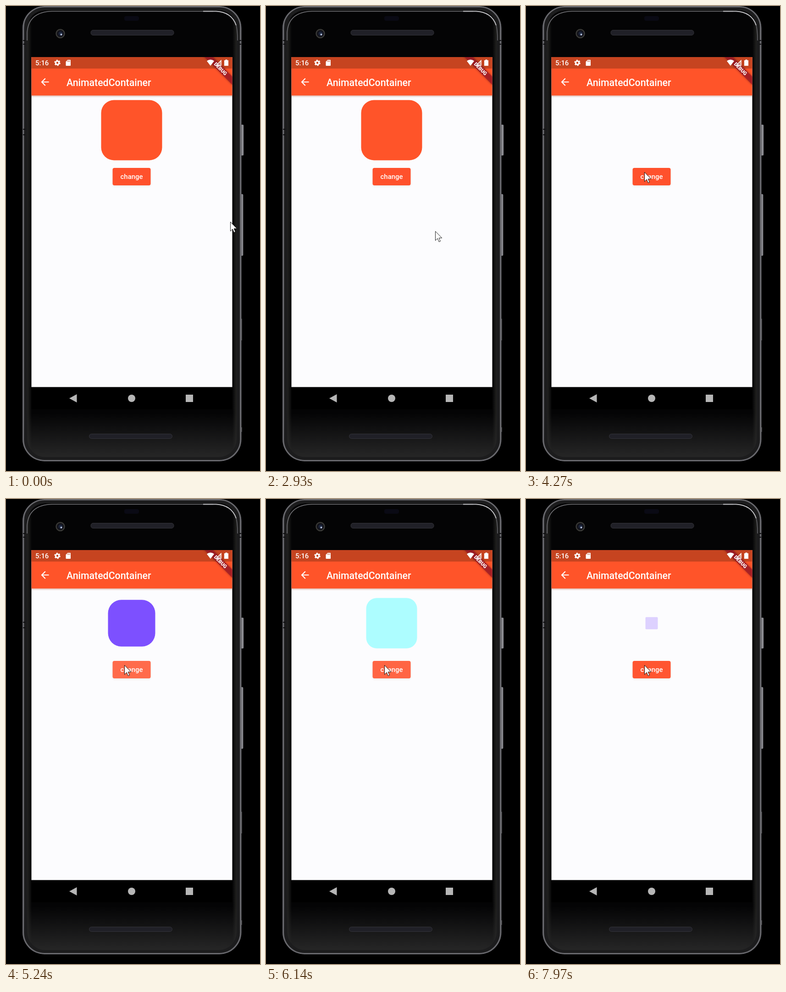
An HTML page that plays this animation: 554 by 1011 pixels, repeating every 8 s.

```html
<!DOCTYPE html>
<html lang="en">
<head>
<meta charset="utf-8">
<title>Animated container</title>
<style>
  html, body { margin: 0; width: 100%; height: 100%; overflow: hidden; background: #000; }
  svg { display: block; width: 100%; height: 100%; }
  text { font-family: Roboto, sans-serif; font-weight: 500; fill: #fff; }
</style>
</head>
<body>
<svg viewBox="0 0 554 1011">
  <defs>
    <linearGradient id="side">
      <stop offset="0" stop-color="#55555a"/>
      <stop offset=".006" stop-color="#75757a"/>
      <stop offset=".012" stop-color="#2a2a2d"/>
      <stop offset=".024" stop-color="#20201e"/>
      <stop offset=".042" stop-color="#040405"/>
      <stop offset=".958" stop-color="#040405"/>
      <stop offset=".976" stop-color="#20201e"/>
      <stop offset=".988" stop-color="#2a2a2d"/>
      <stop offset=".994" stop-color="#75757a"/>
      <stop offset="1" stop-color="#55555a"/>
    </linearGradient>
    <linearGradient id="chin" x2="0" y2="1">
      <stop offset="0" stop-color="#282828" stop-opacity="0"/>
      <stop offset="1" stop-color="#282828"/>
    </linearGradient>
    <linearGradient id="key">
      <stop offset="0" stop-color="#3c3c40"/>
      <stop offset=".6" stop-color="#9a9a9f"/>
      <stop offset="1" stop-color="#66666c"/>
    </linearGradient>
    <linearGradient id="drop" x2="0" y2="1">
      <stop offset="0" stop-color="#a04020" stop-opacity=".35"/>
      <stop offset="1" stop-color="#a04020" stop-opacity="0"/>
    </linearGradient>
    <filter id="blur" x="-20%" y="-40%" width="140%" height="180%"><feGaussianBlur stdDeviation="2"/></filter>
    <clipPath id="body"><rect x="36" y="0" width="477.500" height="990" rx="48"/></clipPath>
    <clipPath id="screen"><path d="M55.500 111H493.500V828.500H55.500Z"/></clipPath>
    <clipPath id="face"><rect x="232.500" y="352" width="83" height="38" rx="4"/></clipPath>
  </defs>

  <!-- phone -->
  <g fill="url(#key)">
    <rect x="511" y="258" width="7.500" height="67" rx="2"/>
    <rect x="511" y="409" width="6.500" height="134" rx="2"/>
    <path d="M511 680h4v47h-4zM511 916h4v10h-4z" opacity=".6"/>
  </g>
  <g clip-path="url(#body)">
    <path d="M36 0H514V990H36Z" fill="url(#side)"/>
    <path d="M36 885H514V986H36Z" fill="url(#chin)"/>
    <g fill="none">
      <rect x="43" y="6" width="463.500" height="978" rx="42" stroke="#1c1c1d" stroke-width="7"/>
      <rect x="37.500" y="1.500" width="474.500" height="987" rx="46.500" stroke="#68686d" stroke-width="3"/>
      <path d="M46 75V58Q49 13 100 11.500H452" stroke="#77777b" stroke-width="1.500"/>
      <path d="M430 11.500H458Q492 13 502 42" stroke="#c0c0c4" stroke-width="2"/>
      <path d="M502 42Q505 52 505 75" stroke="#66666a" stroke-width="1.500"/>
      <path d="M37 75h5M37 83h5M37 268h5M37 280h5M508 75h5M508 83h5" stroke="#0c0c0e" stroke-width="2"/>
    </g>
  </g>
  <rect x="258" y="22" width="32" height="10" rx="4" fill="#0a0a14"/>
  <g fill="#202027" stroke="#34343a">
    <rect x="185" y="52.500" width="181" height="11" rx="5"/>
    <rect x="181.500" y="930.500" width="181" height="10" rx="5"/>
  </g>
  <circle cx="118.500" cy="60" r="9" fill="#12121a" stroke="#393936" stroke-width="2.500"/>
  <circle cx="119" cy="60" r="4.500" fill="#1d263c"/>
  <circle cx="120.500" cy="62" r="2" fill="#b8c6e0"/>
  <path d="M55.500 828H493.500V877H55.500Z"/>
  <g fill="#b6b6b6">
    <path d="M138 853 154.500 844V862Z"/>
    <circle cx="274" cy="853" r="8"/>
    <path d="M392 845h16v16h-16z"/>
  </g>

  <!-- app -->
  <g clip-path="url(#screen)">
    <path d="M55 111H494V829H55Z" fill="#fcfcfe"/>
    <path d="M55 194H494V199H55Z" fill="url(#drop)"/>
    <path d="M55 111H494V194.500H55Z" fill="#ff5429"/>
    <path d="M55 111H494V136H55Z" fill="#c64420"/>
    <g transform="translate(493.500 111) rotate(45)">
      <path d="M-60 29.500H60V43H-60Z" fill="#000" opacity=".3" filter="url(#blur)"/>
      <path d="M-60 29.800H60V42.600H-60Z" fill="#a01428" fill-opacity=".7"/>
      <text y="40" font-size="10.900" text-anchor="middle" style="font-weight:900">DEBUG</text>
    </g>
    <text x="64" y="129" font-size="14.900">5:16</text>
    <circle cx="112" cy="123.500" r="3.700" fill="none" stroke="#fff" stroke-width="3"/>
    <circle cx="112" cy="123.500" r="5.800" fill="none" stroke="#fff" stroke-width="2" stroke-dasharray="3.040"/>
    <g fill="#fff">
      <path d="M134.500 117H140Q141 117 141 118V129Q141 130 140 130H131.500Q130.500 130 130.500 129V121Z"/>
      <path d="M438 119.500Q446 113.500 454 119.500L446 130Z"/>
      <path d="M469 118.500V129.500H458Z" fill-opacity=".4" stroke="#fff" stroke-width="1.500"/>
      <path d="M478.500 116.500h4v1.500h2.500v12h-9v-12h2.500z"/>
      <path transform="translate(72.200 152.500) scale(1.066)" d="M20 11H7.830l5.590-5.590L12 4l-8 8 8 8 1.410-1.410L7.830 13H20z"/>
    </g>
    <path d="M134 118.500v3M136.500 118.500v3M138.800 118.500v3" stroke="#c64420"/>
    <text x="132" y="173.500" font-size="21.320">AnimatedContainer</text>

    <rect id="box"/>
    <rect id="lift" x="232.500" y="354.500" width="83" height="38" rx="4" fill="#000" filter="url(#blur)"/>
    <g clip-path="url(#face)">
      <path d="M232 352h84v38h-84z" fill="#ff512c"/>
      <circle id="ripple" cx="262" cy="371" fill="#fff"/>
    </g>
    <text x="274" y="376.300" font-size="14.900" text-anchor="middle">change</text>
  </g>

  <path id="cursor" d="M0 0V17L4 13.200 6.600 19.400 9.200 18.300 6.600 12.300H12Z" fill="#fff" stroke="#000" stroke-width=".75"/>
</svg>
<script>
const LOOP = 8000;
const el = id => document.getElementById(id);
const set = (id, attrs) => { for (const k in attrs) el(id).setAttribute(k, attrs[k]); };
const clamp = v => Math.max(0, Math.min(1, v));
const mix = (a, b, k) => a + (b - a) * k;
const smooth = k => k * k * (3 - 2 * k);

const taps = [3770, 4870, 5740, 6640, 7500];

// size, corner radius, red, green, blue, alpha: before the first tap and after each
const looks = [
  [133, 28, 255, 84, 41, 1],
  [91, 10, 255, 84, 45, 0],
  [103, 29, 125, 80, 255, 1],
  [111, 23, 173, 253, 255, 1],
  [72, 12, 192, 225, 255, 1],
  [27, 2, 221, 209, 255, 1]
];

// time, x, y of the pointer tip
const path = [
  [30, 489, 469], [830, 348, 435], [860, 348, 435], [1060, 330, 420],
  [1340, 330, 420], [1430, 322, 408], [1640, 322, 408], [1670, 318, 403],
  [1730, 316, 401], [1910, 316, 401], [2300, 273, 343], [2630, 273, 343],
  [2630, 373, 494], [2850, 373, 494], [3570, 258, 361]
];

function pointer(t) {
  const i = path.findIndex(p => p[0] > t);
  if (i < 1) return path[i ? path.length - 1 : 0].slice(1);
  const [a, b] = [path[i - 1], path[i]];
  const k = smooth((t - a[0]) / (b[0] - a[0]));
  return [mix(a[1], b[1], k), mix(a[2], b[2], k)];
}

function draw(t) {
  const n = taps.filter(s => s <= t).length;
  const age = n ? t - taps[n - 1] : LOOP;

  const from = looks[Math.max(0, n - 1)], to = looks[n];
  const k = clamp((age - 65) / 300);
  const [w, r, red, green, blue, alpha] = to.map((v, i) => mix(from[i], v, k));
  const h = w * 0.985;
  set('box', {
    x: 274 - w / 2, y: 270 - h / 2, width: w, height: h, rx: r,
    fill: `rgba(${red},${green},${blue},${alpha})`
  });

  set('ripple', {
    r: 7 + age * 0.2,
    opacity: 0.24 * clamp((age + 20) / 75) * clamp((490 - age) / 190)
  });
  set('lift', { opacity: 0.05 + 0.3 * clamp(age / 80) * clamp((300 - age) / 150) });

  const [x, y] = pointer(t);
  set('cursor', { transform: `translate(${x + 0.5} ${y + 0.5}) scale(1.18)` });
}

function tick() {
  draw(performance.now() % LOOP);
  requestAnimationFrame(tick);
}
tick();
</script>
</body>
</html>
```
